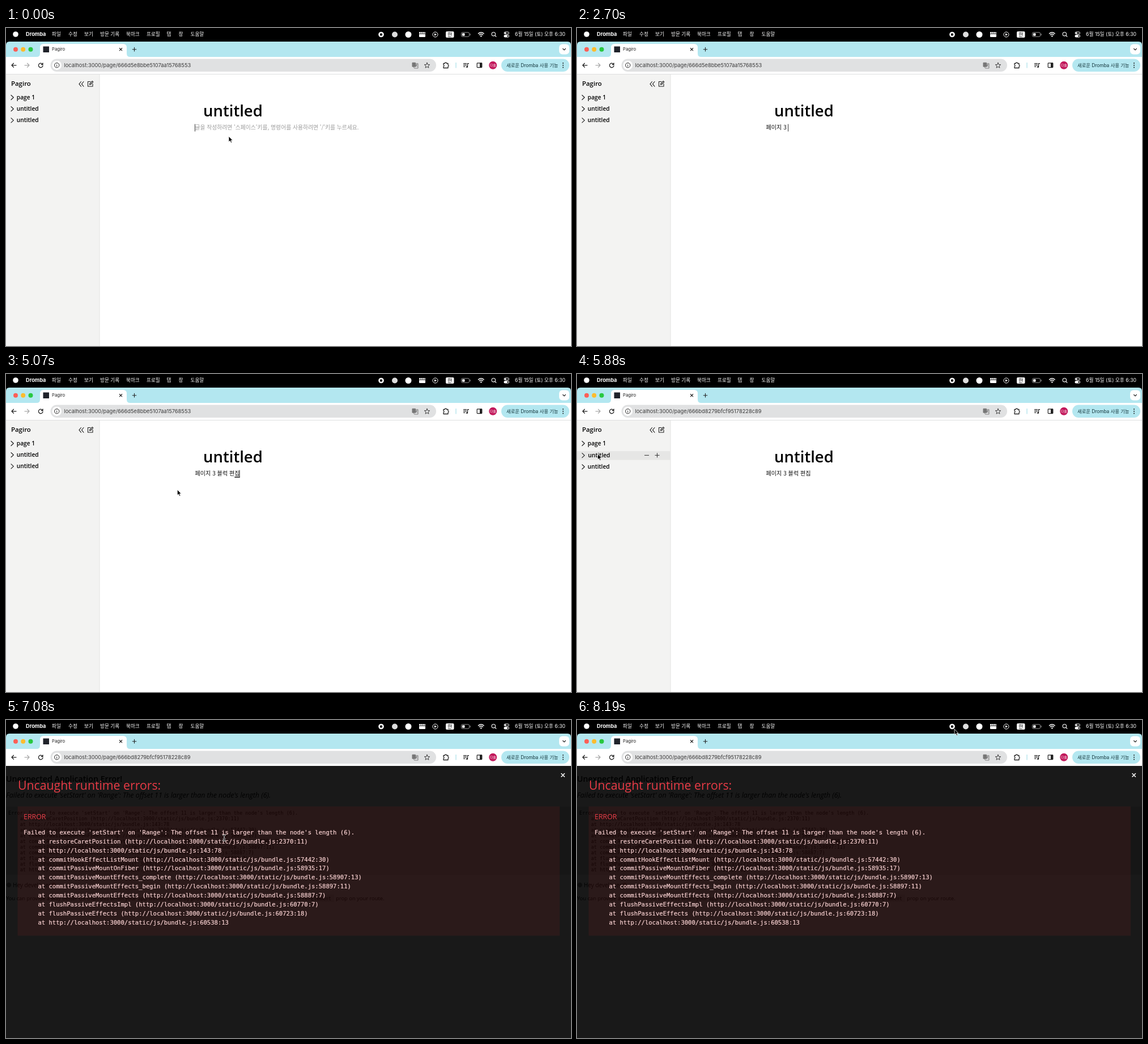
Recreate the animation shown at these times as an HTML page. Size 997 by 561 pixels, loop 8670 ms.

```html
<!DOCTYPE html>
<html lang="ko">
<head>
<meta charset="utf-8">
<title>Page editor</title>
<style>
html, body { margin: 0; width: 100%; height: 100%; overflow: hidden; background: #fff; }
svg { display: block; width: 100vw; height: 100vh; }
text { white-space: pre; }
.ui { font-family: Inter, "Noto Sans CJK KR", "Noto Sans CJK", sans-serif; }
.page { font-family: "Open Sans", "Noto Sans CJK KR", "Noto Sans CJK", sans-serif; }
.ko { font-family: "Noto Sans CJK KR", "Noto Sans CJK", sans-serif; }
.mono { font-family: "DejaVu Sans Mono", monospace; }
.line { fill: none; stroke-linecap: round; stroke-linejoin: round; }
</style>
</head>
<body>
<svg viewBox="0 0 997 561" preserveAspectRatio="none">
  <rect width="997" height="561" fill="#fff"/>

  <g id="editor" class="page">
    <rect y="82" width="165" height="479" fill="#f3f3f2"/>
    <path d="M165 82V561" stroke="#e2e2e1"/>
    <path d="M0 81.5H997" stroke="#dedfe0"/>
    <text x="9" y="102" font-size="11.4" font-weight="600">Pagiro</text>
    <path class="line" d="M132.5 94.5L129 98.8L132.5 103.1M137 94.5L133.5 98.8L137 103.1" stroke="#222" stroke-width="1.1"/>
    <path class="line" d="M149 94.5H144.5V103H153V98.5M147.5 100L148 98L152.3 93.7L153.8 95.2L149.5 99.5Z" stroke="#222" stroke-width="1.1"/>
    <g id="rows"></g>
    <text x="348" y="155.5" font-size="27.5" font-weight="600">untitled</text>
    <text id="hint" class="ko" x="333.5" y="178.7" font-size="9.8" fill="#9b9b9b">글을 작성하려면 '스페이스'키를, 명령어를 사용하려면 '/'키를 누르세요.</text>
    <text class="ko" x="333.5" y="178.7" font-size="10.1" fill="#111"><tspan id="done"></tspan><tspan id="draft"></tspan></text>
    <rect id="under" y="181.2" height="1.5" fill="#111"/>
    <rect id="caret" y="169.5" width="1" height="13" fill="#333"/>
  </g>

  <g id="crash">
    <g class="page">
      <rect y="153" width="997" height="120" fill="#e3e3e3"/>
      <text x="0" y="108.5" font-size="14.2" font-weight="600">Unexpected Application Error!</text>
      <text x="0" y="137" font-size="12.4" font-weight="500" font-style="italic" id="subtitle"></text>
      <g id="trace" class="mono" font-size="8.58"></g>
      <circle cx="5" cy="291" r="4.2" fill="#888"/>
      <text x="12" y="294.5" font-size="10">Hey developer</text>
      <circle cx="84" cy="291" r="4.2" fill="#b98"/>
      <rect x="424" y="308" width="73" height="13" fill="#e3e3e3"/>
      <rect x="508" y="308" width="71" height="13" fill="#e3e3e3"/>
      <text x="0" y="318" font-size="9.4">You can provide a way better UX than this when your app throws errors by providing your own</text>
      <text class="mono" x="427" y="318" font-size="8.58">ErrorBoundary</text>
      <text x="498" y="318" font-size="9.4">or</text>
      <text class="mono" x="512" y="318" font-size="8.58">errorElement</text>
      <text x="582" y="318" font-size="9.4">prop on your route.</text>
    </g>
    <rect y="81" width="997" height="480" fill="#000" opacity=".9"/>
    <rect x="20.5" y="152.5" width="956.5" height="228" fill="#ce2828" opacity=".1"/>
    <g class="page" fill="#e83b46">
      <text x="21" y="122.5" font-size="21.25">Uncaught runtime errors:</text>
      <text x="31" y="174.5" font-size="12.4">ERROR</text>
    </g>
    <path class="line" d="M980 94.5L985.5 100M985.5 94.5L980 100" stroke="#fff" stroke-width="1.6"/>
    <g id="stack" class="mono" font-size="10.56" fill="#fcd4d4" stroke="#fcd4d4" stroke-width=".2"></g>
  </g>

  <g class="ui">
    <rect width="997" height="32" fill="#000"/>
    <circle cx="17" cy="11" r="4.8" fill="#fff"/>
    <text x="35" y="14.3" font-size="9.2" font-weight="700" fill="#fff">Dromba</text>
    <g id="menu" class="ko" font-size="8.6" font-weight="500" fill="#fff"></g>
    <circle cx="662" cy="11.5" r="4.8" fill="#fff"/>
    <rect x="660" y="9.5" width="4" height="4" rx=".8" fill="#000"/>
    <circle cx="686" cy="11.5" r="5" fill="#ddd"/>
    <circle cx="710" cy="11.5" r="5.5" fill="#fff"/>
    <rect x="729" y="7" width="11" height="9" rx="1" fill="#fff"/>
    <path d="M729 10.3H740M732 7V10M735 7V10M738 7V10" stroke="#000" stroke-width=".8"/>
    <circle cx="757.5" cy="11.5" r="4.5" fill="none" stroke="#fff"/>
    <path d="M756 9.3L760 11.5L756 13.7Z" fill="#fff"/>
    <rect x="776" y="6" width="14.5" height="11" rx="2" fill="#fff"/>
    <text class="ko" x="783.2" y="14.8" text-anchor="middle" font-size="8.6" font-weight="500">한</text>
    <rect x="803.5" y="7.8" width="14" height="7.4" rx="2" fill="none" stroke="#999"/>
    <rect x="805" y="9.3" width="4.5" height="4.4" rx=".8" fill="#fff"/>
    <path d="M819.3 10V13" stroke="#999"/>
    <path class="line" d="M833.5 9.8Q838.3 5.8 843.1 9.8M835.3 12Q838.3 9.5 841.3 12" stroke="#fff" stroke-width="1.5"/>
    <circle cx="838.3" cy="14.3" r="1.3" fill="#fff"/>
    <circle cx="860.3" cy="10.7" r="3.2" fill="none" stroke="#fff" stroke-width="1.1"/>
    <path d="M862.7 13.1L865.2 15.6" stroke="#fff" stroke-width="1.2"/>
    <rect x="879" y="7" width="8.5" height="3.6" rx="1.8" fill="none" stroke="#fff"/>
    <rect x="878.5" y="12" width="9.5" height="4.4" rx="2.2" fill="#fff"/>
    <circle cx="881" cy="8.8" r="1.3" fill="#fff"/>
    <circle cx="885.7" cy="14.2" r="1.3" fill="#000"/>
    <text x="987" y="14.3" text-anchor="end" font-size="8.7" fill="#fff">6월 15일 (토) 오후 6:30</text>

    <path d="M0 51V30Q0 24 6 24H991Q997 24 997 30V51Z" fill="#b3e7f0"/>
    <circle cx="17" cy="37.7" r="4" fill="#ff5f57"/>
    <circle cx="30.2" cy="37.7" r="4" fill="#febc2e"/>
    <circle cx="43.5" cy="37.7" r="4" fill="#28c840"/>
    <path d="M54 51Q60 51 60 45V34.5Q60 28 66.5 28H206.5Q213 28 213 34.5V45Q213 51 219 51Z" fill="#fff"/>
    <rect x="65.5" y="32.5" width="10.5" height="10.5" fill="#20232a"/>
    <text x="81" y="40.2" font-size="7.7" fill="#222">Pagiro</text>
    <path class="line" d="M200.3 35.5L204.7 39.9M204.7 35.5L200.3 39.9M223.2 37.7H229.8M226.5 34.4V41" stroke="#222" stroke-width="1.1"/>
    <rect x="976" y="28.5" width="18" height="18" rx="6" fill="#fff"/>
    <path class="line" d="M982.7 36.5L985 38.8L987.3 36.5" stroke="#222" stroke-width="1.2"/>

    <rect y="51" width="997" height="30" fill="#fff"/>
    <g class="line" stroke-width="1.3">
      <path d="M18 65.8H10M13.5 62.2L10 65.8L13.5 69.4" stroke="#222"/>
      <path d="M33 65.8H41M37.5 62.2L41 65.8L37.5 69.4" stroke="#aaa"/>
      <path d="M64.5 64A3.8 3.8 0 1 0 65 66.5M65 61.8V64.5H62.3" stroke="#222"/>
    </g>
    <rect x="78.5" y="54.5" width="680.5" height="22.5" rx="11.2" fill="#e0e1e2"/>
    <circle cx="89.7" cy="65.7" r="8.3" fill="#fff"/>
    <circle cx="89.7" cy="65.7" r="4.2" fill="none" stroke="#222"/>
    <path d="M89.7 65.3V68M89.7 63.3V64.3" stroke="#222"/>
    <text id="url" x="102.5" y="69" font-size="9.3" fill="#3a3a3a"></text>
    <rect x="716.5" y="60.7" width="6.5" height="8" rx="1" fill="#777"/>
    <path class="line" d="M723.5 62.7H727V71H720.5L719.5 69M723 65H726M724.5 64V65Q724 67.5 722.5 68.5M723.5 66L726 68.5" stroke="#666" stroke-width=".8"/>
    <path class="line" id="star" stroke="#444"/>
    <path class="line" d="M772 62.5H774.3A1.6 1.6 0 0 1 777.5 62.5H780V65A1.6 1.6 0 0 1 780 68V70.5H772V68A1.6 1.6 0 0 0 772 65Z" stroke="#222" stroke-width="1.3"/>
    <path d="M794 61V70.5" stroke="#a9dfea" stroke-width="1.2"/>
    <path d="M807 62.7H813M807 65.4H813M807 68.1H810.5M814.5 68.5V62.7H817" fill="none" stroke="#222" stroke-width="1.2"/>
    <circle cx="813.5" cy="68.5" r="1.5" fill="#222"/>
    <rect x="831.2" y="61.8" width="8.6" height="7.8" rx=".8" fill="none" stroke="#222" stroke-width="1.2"/>
    <rect x="836" y="61.5" width="4" height="8.5" fill="#222"/>
    <circle cx="859.2" cy="65.7" r="7" fill="#c2185b"/>
    <text class="ko" x="859.2" y="68" text-anchor="middle" font-size="6" fill="#fff">다솔</text>
    <rect x="874" y="54.5" width="120" height="22.5" rx="11.2" fill="#b3e7f0"/>
    <text x="883" y="68.8" font-size="8.3" fill="#12343a">새로운 Dromba 사용 기능</text>
    <g fill="#222"><circle cx="983" cy="62" r="1"/><circle cx="983" cy="65.7" r="1"/><circle cx="983" cy="69.4" r="1"/></g>
  </g>

  <g id="mouse">
    <path id="arrow" d="M0 0V10L2.3 8L4 11.5L5.6 10.7L4 7.3H7Z" fill="#000" stroke="#fff" stroke-width=".8" stroke-linejoin="round"/>
    <g id="beam" class="line">
      <path d="M-2 -5Q0 -5 0 -3.5Q0 -5 2 -5M0 -4V4M-2 5Q0 5 0 3.5Q0 5 2 5M-1.3 1.7H1.3" stroke="#fff" stroke-width="2"/>
      <path d="M-2 -5Q0 -5 0 -3.5Q0 -5 2 -5M0 -4V4M-2 5Q0 5 0 3.5Q0 5 2 5M-1.3 1.7H1.3" stroke="#000" stroke-width=".9"/>
    </g>
  </g>
</svg>
<script>
const LOOP = 8670, CLICK = 5880, CRASH = 5910;
const NS = "http://www.w3.org/2000/svg";
const $ = id => document.getElementById(id);

function add(parent, tag, attrs, content = "") {
  const el = document.createElementNS(NS, tag);
  for (const key in attrs) el.setAttribute(key, attrs[key]);
  el.textContent = content;
  parent.appendChild(el);
  return el;
}
const show = (el, on) => el.setAttribute("visibility", on ? "visible" : "hidden");

// Menu bar and toolbar details
[[81, "파일"], [110, "수정"], [138, "보기"], [166, "방문 기록"], [212, "북마크"],
 [248, "프로필"], [283.5, "탭"], [304.5, "창"], [325.5, "도움말"]]
  .forEach(([x, label]) => add($("menu"), "text", { x, y: 14.2 }, label));

const starPoints = Array.from({ length: 10 }, (_, i) => {
  const r = i % 2 ? 2.2 : 5, a = i * Math.PI / 5 - Math.PI / 2;
  return [743 + r * Math.cos(a), 66.2 + r * Math.sin(a)].map(v => v.toFixed(2)).join(" ");
});
$("star").setAttribute("d", "M" + starPoints.join("L") + "Z");

// Sidebar rows
const rows = ["page 1", "untitled", "untitled"].map((label, i) => {
  const y = 122 + i * 20.2;
  const g = add($("rows"), "g", {});
  const bar = add(g, "rect", { y: y - 7, width: 164.5, height: 15.5, fill: "#e6e6e5" });
  const icons = add(g, "path", { d: `M119 ${y + .3}H127M137.5 ${y + .3}H145.5M141.5 ${y - 3.7}V${y + 4.3}`, stroke: "#333" });
  add(g, "path", { class: "line", d: `M9 ${y - 3.5}L13.3 ${y + .5}L9 ${y + 4.5}`, stroke: "#222", "stroke-width": 1.2 });
  const text = add(g, "text", { x: 18.8, y: y + 3.8, "font-size": 10.2, "font-weight": 600 }, label);
  return { y, g, bar, icons, text };
});

// Error report
const message = "Failed to execute 'setStart' on 'Range': The offset 11 is larger than the node's length (6).";
const calls = [
  ["restoreCaretPosition", "2370:11"], ["", "143:78"], ["commitHookEffectListMount", "57442:30"],
  ["commitPassiveMountOnFiber", "58935:17"], ["commitPassiveMountEffects_complete", "58907:13"],
  ["commitPassiveMountEffects_begin", "58897:11"], ["commitPassiveMountEffects", "58887:7"],
  ["flushPassiveEffectsImpl", "60770:7"], ["flushPassiveEffects", "60723:18"], ["", "60538:13"]
].map(([name, at]) => {
  const url = "http://localhost:3000/static/js/bundle.js:" + at;
  return "    at " + (name ? `${name} (${url})` : url);
});
function report(parent, x, y, step, first) {
  [first, ...calls].forEach((line, i) => add(parent, "text", { x, y: y + i * step }, line));
}
$("subtitle").textContent = message;
report($("trace"), 4, 167, 9.95, "Error: " + message);
report($("stack"), 31, 202, 15.87, message);

// Typing: time, committed text, syllable being composed, caret shown
const typing = [
  [0, "", "", 1], [480, "", "ㅍ", 1], [840, "", "페", 1], [1500, "", "펭", 1], [1650, "페", "이", 1],
  [1800, "페", "잊", 1], [2010, "페이", "지", 1], [2250, "페이지 ", "", 1], [2430, "페이지 3", "", 1],
  [2700, "페이지 3 ", "", 1], [2880, "페이지 3 ", "", 0], [3120, "페이지 3 ", "ㅂ", 1],
  [3270, "페이지 3 ", "브", 1], [3420, "페이지 3 ", "블", 1], [3660, "페이지 3 블", "ㄹ", 0],
  [3780, "페이지 3 블", "러", 1], [3900, "페이지 3 블", "럭", 1], [4020, "페이지 3 블럭 ", "", 1],
  [4080, "페이지 3 블럭 ", "ㅍ", 1], [4140, "페이지 3 블럭 ", "펴", 1], [4200, "페이지 3 블럭 ", "편", 1],
  [4380, "페이지 3 블럭 편", "ㅈ", 1], [4470, "페이지 3 블럭 편", "지", 1], [4560, "페이지 3 블럭 편", "집", 1],
  [5100, "페이지 3 블럭 편", "집", 0], [5550, "페이지 3 블럭 편집", "", 0]
];

// Pointer stops: time, x, y
const path = [
  [0, 393, 191], [4620, 393, 191], [4920, 376, 212], [5220, 230, 196], [5550, 60, 150],
  [5760, 37, 141], [5880, 36.5, 141], [5910, 35.5, 140.5], [6150, 35.5, 140.5], [6600, 250, 196],
  [7050, 385, 208], [7110, 385, 208], [7500, 430, 226], [7830, 520, 180], [8180, 666, 16], [LOOP, 666, 16]
];
function pointer(t) {
  const i = Math.max(1, path.findIndex(p => p[0] > t));
  const [t0, x0, y0] = path[i - 1], [t1, x1, y1] = path[i];
  const k = (t - t0) / (t1 - t0), e = k * k * (3 - 2 * k);
  return [x0 + (x1 - x0) * e, y0 + (y1 - y0) * e];
}

function drawEditor(t, x, y) {
  const [, done, draft, caret] = typing.filter(s => s[0] <= t).pop();
  $("done").textContent = done;
  $("draft").textContent = draft;
  show($("hint"), !done && !draft);
  const start = 333.5 + (done ? $("done").getComputedTextLength() : 0);
  const width = draft ? $("draft").getComputedTextLength() : 0;
  $("under").setAttribute("x", start);
  $("under").setAttribute("width", width);
  $("caret").setAttribute("x", start + width - (draft ? 1 : .5));
  $("caret").setAttribute("opacity", caret);

  const hover = t > 4620 && x < 165 ? rows.findIndex(r => Math.abs(y - r.y) < 8) : -1;
  rows.forEach((r, i) => {
    const on = i === hover;
    r.bar.setAttribute("opacity", +on);
    r.icons.setAttribute("opacity", +on);
    r.text.setAttribute("x", on ? 19.6 : 18.8);
    r.g.setAttribute("transform", `translate(0 ${hover >= 0 && i >= hover ? .9 : 0})`);
  });
}

function draw(t) {
  const [x, y] = pointer(t), crashed = t >= CRASH;
  $("editor").setAttribute("display", crashed ? "none" : "inline");
  $("crash").setAttribute("display", crashed ? "inline" : "none");
  if (!crashed) drawEditor(t, x, y);
  $("url").textContent = "localhost:3000/page/" + (t < CLICK ? "666d5e8bbe5107aa15768553" : "666bd8279bfcf95178228c89");

  const overText = crashed && x > 45 && x < 630 && y > 160 && y < 365;
  $("mouse").setAttribute("transform", `translate(${x} ${y})`);
  $("mouse").setAttribute("opacity", t < 480 || t >= 4620 ? 1 : 0);
  show($("arrow"), !overText);
  show($("beam"), overText);
}

const begin = performance.now();
function tick() {
  draw((performance.now() - begin) % LOOP);
  requestAnimationFrame(tick);
}
draw(0);
requestAnimationFrame(tick);
</script>
</body>
</html>
```
